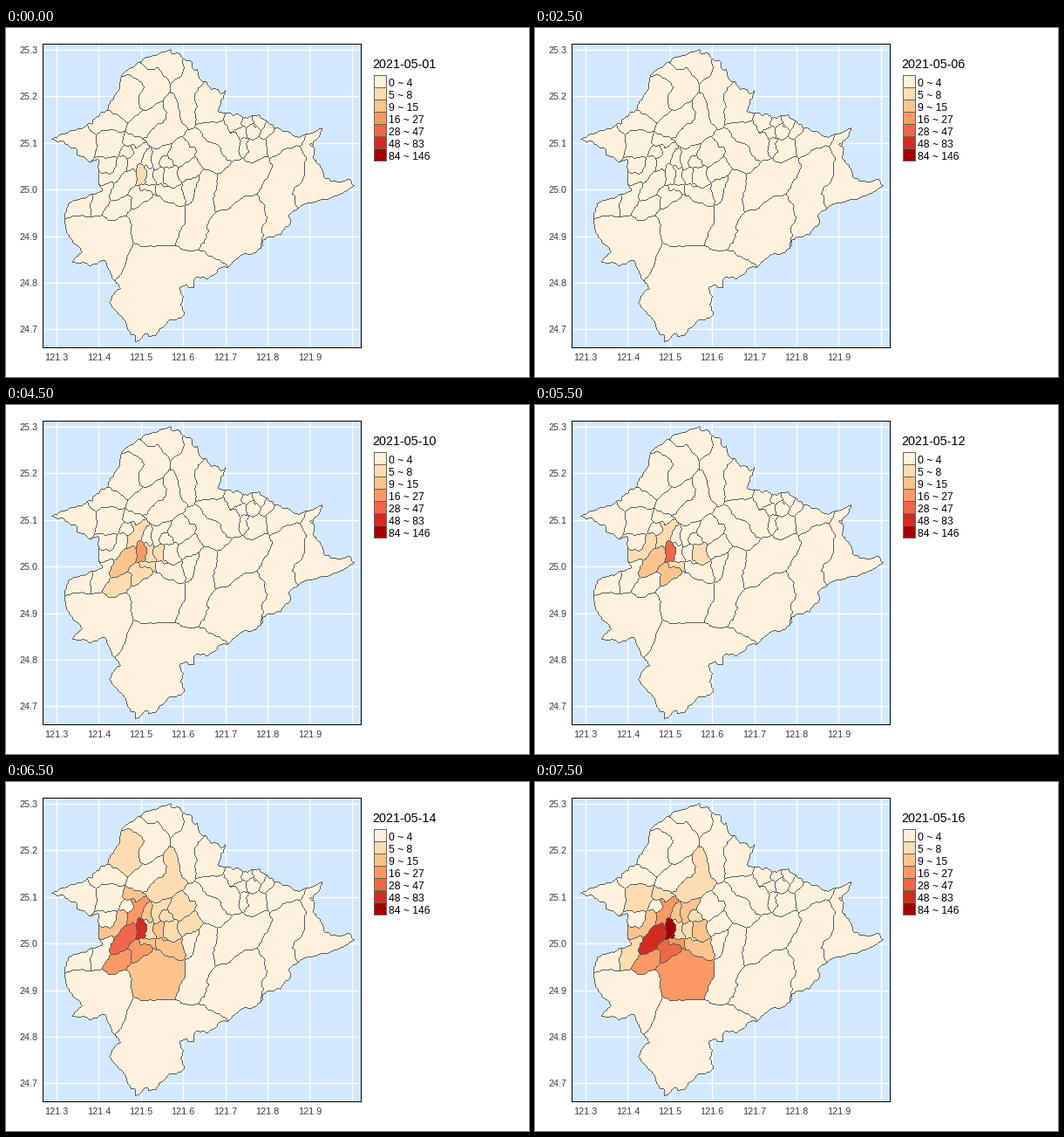
These frames come from a looping animation (600x400 px, 8000 ms). A matplotlib script:

```python
import math
import random

import matplotlib.pyplot as plt
import numpy as np
from matplotlib.animation import FuncAnimation
from matplotlib.colors import to_rgba, to_rgba_array
from matplotlib.patches import Rectangle
from matplotlib.path import Path

W, H, DPI = 600, 400, 100
DAYS, STEP_MS = 16, 500
PX = 72 / DPI
SHADES = ["#fff1dc", "#fddcb1", "#fdc38d", "#fc9865", "#ee6748", "#d22c20", "#a50000"]
BREAKS = [0, 5, 9, 16, 28, 48, 84, 147]
SEA, BORDER = "#d2e8ff", "#5c5c5c"

COAST = [
    (49, 126), (72, 119), (97, 110), (115, 91), (127, 70), (131, 55), (150, 38),
    (170, 29), (190, 25), (213, 39), (218, 47), (222, 60), (232, 64), (246, 75),
    (252, 69), (246, 82), (245, 95), (258, 101), (264, 97), (274, 103), (288, 99),
    (303, 111), (330, 121), (345, 121), (361, 116), (352, 135), (356, 152),
    (364, 170), (378, 175), (392, 171), (400, 179), (380, 194), (357, 197),
    (336, 204), (325, 212), (326, 222), (315, 237), (297, 240), (294, 254),
    (278, 258), (254, 271), (232, 287), (219, 286), (214, 295), (200, 298),
    (203, 318), (201, 331), (175, 344), (173, 350), (148, 360), (141, 343),
    (119, 316), (119, 306), (130, 298), (112, 269), (97, 273), (76, 268),
    (85, 256), (68, 232), (66, 219), (70, 197), (90, 196), (108, 185),
    (106, 153), (82, 147), (78, 135),
]


def warped_grid():
    """Pixel grid bent by small random waves, so straight borders turn ragged."""
    rng = random.Random(12)
    y, x = np.mgrid[0:H, 0:W].astype(float)
    dx, dy = np.zeros_like(x), np.zeros_like(y)
    for length in (24, 14, 9, 6):
        for shift in (dx, dy) * 3:
            angle, phase = rng.uniform(0, math.tau), rng.uniform(0, math.tau)
            along = x * math.cos(angle) + y * math.sin(angle)
            shift += 0.035 * length * np.sin(math.tau * along / length + phase)
    return x + dx, y + dy


GX, GY = warped_grid()
reach = np.full((H, W), np.inf)
label = np.zeros((H, W), int)
schedules = []


def district(radius, *spine, steps=()):
    """Claim the pixels nearer to this spine than to any other, less the radius.

    steps holds (day, level) pairs, the level lasting until the next pair.
    """
    dist = np.full((H, W), np.inf)
    for (ax_, ay), (bx, by) in zip(spine, spine[1:] or spine):
        ux, uy = bx - ax_, by - ay
        t = ((GX - ax_) * ux + (GY - ay) * uy) / max(ux * ux + uy * uy, 1)
        t = np.clip(t, 0, 1)
        dist = np.minimum(dist, np.hypot(GX - ax_ - t * ux, GY - ay - t * uy))
    won = dist - radius < reach
    reach[won] = (dist - radius)[won]
    label[won] = len(schedules)
    schedules.append(steps)


# West bank
district(6, (155, 164), (154, 175),
         steps=((1, 1), (2, 0), (7, 1), (8, 2), (9, 3), (11, 4), (14, 5), (16, 6)))
district(8.5, (143, 171), (126, 190),
         steps=((9, 1), (10, 2), (13, 3), (14, 4), (15, 5)))
district(7.5, (151, 143), (146, 157), steps=((10, 1), (13, 2), (14, 3)))
district(7, (147, 190), (148, 197), (160, 193),
         steps=((10, 1), (12, 2), (14, 3), (15, 4)))
district(4, (158, 182), (167, 186), steps=((10, 1), (14, 2), (16, 3)))
district(8, (137, 198), (120, 210), steps=((10, 1), (11, 0), (13, 2), (14, 3)))
district(6, (111, 172), (124, 174), (133, 157), steps=((12, 1), (13, 2)))
district(5, (139, 128), (149, 129), steps=((13, 1), (14, 2), (16, 1)))
district(7, (114, 184), (111, 200), (101, 209),
         steps=((13, 1), (14, 0), (15, 2), (16, 1)))
district(14, (170, 203), (158, 215), (158, 238), (187, 232), (192, 216),
         steps=((13, 2), (16, 3)))
district(15, (120, 131), steps=((16, 1),))
district(13, (142, 65), (134, 78), (139, 92), steps=((14, 1), (15, 0)))
district(6, (112, 158), (121, 156))
district(5, (139, 142))

# City centre
district(4, (163, 163), (166, 178), steps=((10, 1), (11, 0), (13, 1)))
district(5, (181, 141), (171, 145), (171, 156), steps=((14, 1), (16, 2)))
district(4, (162, 146), (162, 156), steps=((14, 2),))
district(6, (181, 154), (184, 152), steps=((14, 1),))
district(8, (174, 168), (176, 173),
         steps=((10, 1), (11, 0), (13, 1), (14, 2), (16, 1)))
district(8, (190, 167), (189, 173), steps=((12, 1), (16, 2)))
district(12, (203, 139), (197, 148), steps=((14, 1), (15, 0)))
district(8, (212, 159), (203, 167), steps=((14, 1), (15, 0)))
district(9, (178, 188), (197, 193), steps=((14, 2),))
district(9, (190, 89), (193, 110), (192, 118), (174, 127), steps=((14, 1),))
district(10, (175, 96), (156, 108), (150, 114))

# North coast
district(11, (141, 49), (162, 57), (172, 66), (163, 82))
district(8, (163, 36), (185, 36), (190, 48))
district(11, (214, 52), (206, 72), (206, 98))
district(13, (233, 75), (228, 96))
district(8, (105, 109), (128, 110))
district(10, (62, 125), (96, 130))

# South
district(9, (78, 205), (90, 206))
district(17, (84, 232), (130, 236), (118, 265))
district(26, (158, 330), (160, 272), (225, 285))

# East
district(18, (280, 214), (250, 230), (245, 250))
district(15, (230, 185), (217, 215), (213, 240))
district(9, (213, 180), (210, 193))
district(16, (247, 190), (288, 164))
district(12, (217, 130), (240, 150))
district(10, (230, 115), (257, 138))
district(9, (287, 138), (285, 148))
district(11, (328, 125), (313, 133))
district(16, (328, 152), (308, 184), (313, 220))
district(13, (351, 138), (356, 170), (345, 190))
district(7, (273, 138))
for i in range(6):
    district(6, (264 + 6.4 * i, 107 + 11 * (i % 2)))

# Sea gets -1; a line runs along the higher-numbered side of each border
points = np.column_stack([GX.ravel(), GY.ravel()])
land = Path(COAST + COAST[:1], closed=True).contains_points(points).reshape(H, W)
label[~land] = -1
lines = np.zeros((H, W), bool)
for axis in (0, 1):
    for side in (-1, 1):
        lines |= label > np.roll(label, side, axis)


def level_on(day, steps):
    return max(((d, lv) for d, lv in steps if d <= day), default=(0, 0))[1]


def paint(day):
    fills = to_rgba_array([SHADES[level_on(day, s)] for s in schedules])
    rgba = fills[label]
    rgba[~land] = 0
    rgba[lines] = to_rgba(BORDER)
    return rgba


fig = plt.figure(figsize=(W / DPI, H / DPI), dpi=DPI, facecolor="white")
ax = fig.add_axes([0, 0, 1, 1])
ax.axis("off")
chart = ax.imshow(paint(1), extent=(0, W, H, 0), interpolation="nearest",
                  aspect="auto", zorder=2)
ax.set_xlim(0, W)
ax.set_ylim(H, 0)


def text(x, y, s, size, color="black", ha="left"):
    return ax.text(x, y, s, fontsize=size * PX, color=color, ha=ha,
                   va="baseline", family="Liberation Sans", zorder=5)


def box(x, y, w, h, fill, edge, z):
    ax.add_patch(Rectangle((x, y), w, h, fc=fill, ec=edge, lw=PX, aa=False, zorder=z))


# Panel, grid and axis labels
box(42, 18, 365, 348, SEA, "none", 0)
for i in range(8):
    x, y = 58 + 48.4 * i, 25 + 53.4 * i
    ax.plot([x, x], [18, 366], color="white", lw=1.3 * PX, zorder=1)
    if i < 7:
        ax.plot([42, 407], [y, y], color="white", lw=1.3 * PX, zorder=1)
        text(x, 381, f"{121.3 + i / 10:.1f}", 10.7, "#3c3c3c", "center")
        text(36.5, y + 4, f"{25.3 - i / 10:.1f}", 10.7, "#3c3c3c", "right")
box(42, 18, 365, 348, "none", "black", 4)

# Legend
title = text(420, 46, "", 14.4)
for i, shade in enumerate(SHADES):
    box(422, 54 + 14 * i, 14, 14, shade, "#666666", 4)
    text(439, 67 + 14 * i, f"{BREAKS[i]} ~ {BREAKS[i + 1] - 1}", 12.2)


def draw(i):
    title.set_text(f"2021-05-{i + 1:02d}")
    chart.set_data(paint(i + 1))
    return [chart, title]


anim = FuncAnimation(fig, draw, frames=DAYS, interval=STEP_MS, repeat=True,
                     repeat_delay=0, blit=False)
plt.show()
```
